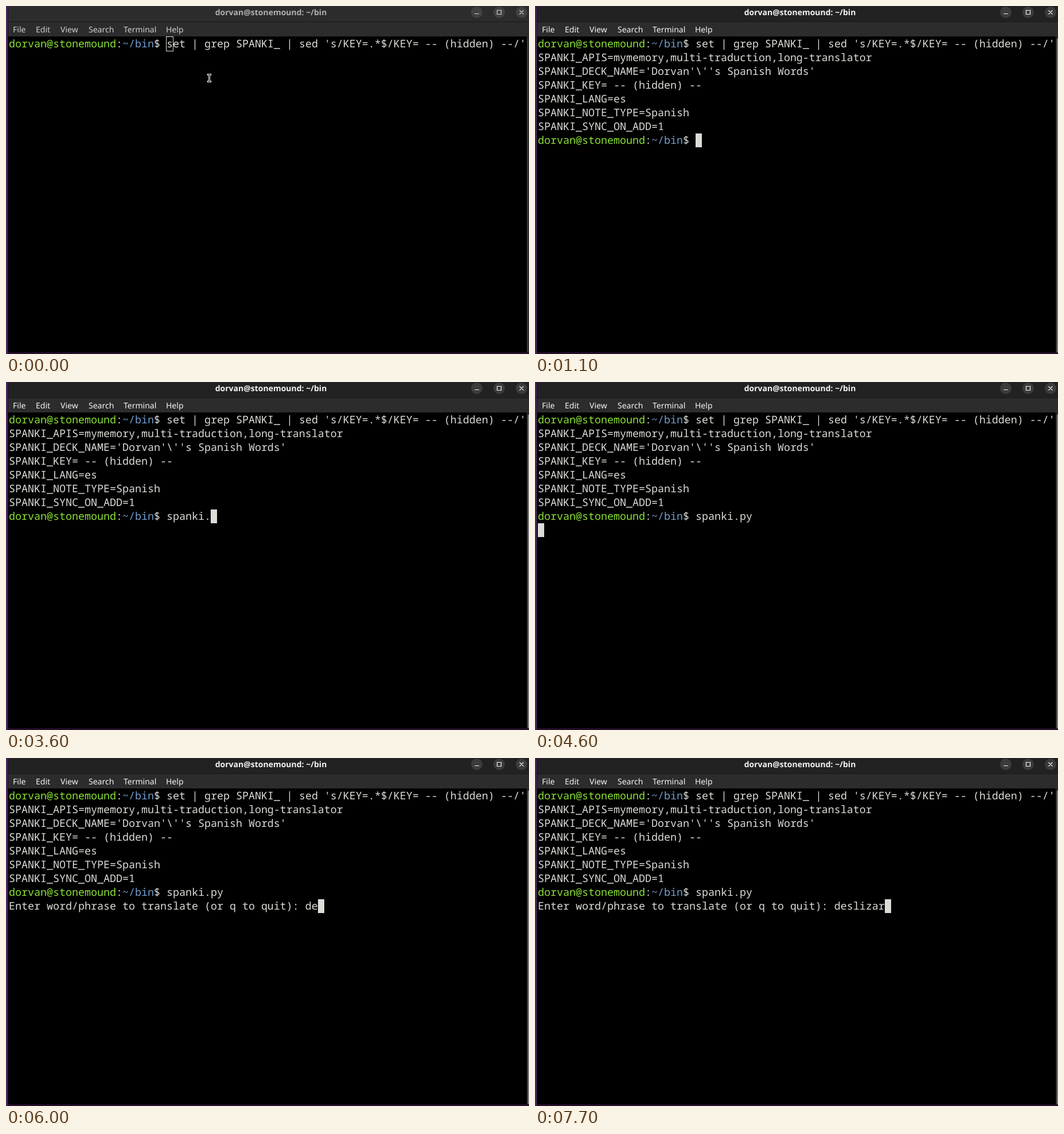
Recreate the animation shown at these times as an HTML page. Size 912 by 606 pixels, loop 8 s.

```html
<!DOCTYPE html>
<html lang="en">
<head>
<meta charset="utf-8">
<title>Terminal</title>
<style>
  html, body { margin: 0; width: 100%; height: 100%; overflow: hidden; background: #000; }
  svg { display: block; width: 912px; height: 606px; }
  text { white-space: pre; text-rendering: geometricPrecision; }
  .ui { font: 14px "Noto Sans", "Open Sans", sans-serif; fill: #f5f5f5; }
  .title { font-weight: 600; text-anchor: middle; }
  .term { font: 18.3333px "Noto Sans Mono", "DejaVu Sans Mono", monospace; fill: #dcdcd6; }
  .user { fill: #8ae234; }
  .path { fill: #729fcf; }
  .bar { fill: #222; }
  .button { fill: #3b3b3b; }
  .icon { fill: none; stroke: #f2f2f2; stroke-width: 1.2; }
  .thumb { fill: #4a4a4a; }
  .edge { fill: #a0a0a0; }
  .blurred .bar { fill: #2c2c2c; }
  .blurred .ui { fill: #cfcfcf; }
  .blurred .title { fill: #b0b0b0; }
  .blurred .button { fill: #414141; }
  .blurred .icon { stroke: #cfcfcf; }
  .blurred .thumb { fill: #3c3c3c; }
  .blurred .edge { fill: #232323; }
</style>
</head>
<body>
<svg id="stage" viewBox="0 0 912 606">
  <rect width="912" height="606"/>
  <rect width="3" height="606" fill="#4a2460"/>
  <rect x="3" width="1" height="606" fill="#1c1022"/>
  <rect class="bar" x="4" width="908" height="27"/>
  <rect x="4" y="27" width="908" height="1" fill="#171717"/>
  <rect x="4" y="28" width="908" height="25" fill="#2c2c2c"/>
  <rect x="908" y="53" width="4" height="550" fill="#232323"/>
  <rect class="thumb" x="909" y="57" width="2" height="546"/>
  <rect class="edge" x="911" y="57" width="1" height="546"/>
  <rect x="3" y="603" width="909" height="3" fill="#241029"/>
  <text class="ui title" x="462" y="16">dorvan@stonemound: ~/bin</text>
  <g id="menu"></g>
  <g class="button">
    <circle cx="821" cy="11" r="10"/><circle cx="860" cy="11" r="10"/><circle cx="899" cy="11" r="10"/>
  </g>
  <path class="icon" d="M817 13.5h8 M856.5 7.5h7v7h-7z M895.5 7.5l7 7m0-7l-7 7"/>
  <g id="rows"></g>
  <rect id="hollow" x="279.5" y="53.5" width="12" height="25" fill="none" stroke="#dcdcd6"/>
  <rect id="block" width="11" height="24" fill="#dcdcd6"/>
  <text id="under" class="term" x="280" y="72" style="fill:#000">s</text>
  <g id="pointer" fill="none">
    <path d="M351 119.5h7 M351 131.5h7 M354.5 119v13" stroke="#fff" stroke-width="3"/>
    <path d="M352 119.5h5 M352 131.5h5 M354.5 119v13" stroke="#000"/>
  </g>
</svg>
<script>
const LOOP = 8000, CELL = 11, LINE = 24, LEFT = 5, TOP = 54, PROMPT = 25;
const $ = id => document.getElementById(id);

function add(parent, tag, attrs, text = "") {
  const el = document.createElementNS("http://www.w3.org/2000/svg", tag);
  for (const key in attrs) el.setAttribute(key, attrs[key]);
  el.textContent = text;
  return parent.appendChild(el);
}

const menu = { File: 12, Edit: 52, View: 95, Search: 144, Terminal: 205, Help: 279 };
for (const label in menu) add($("menu"), "text", { class: "ui", x: menu[label], y: 46 }, label);

function addRow(row, text) {
  return add($("rows"), "text", { class: "term", x: LEFT, y: TOP + 18 + row * LINE }, text);
}

function addPrompt(row, command) {
  const line = addRow(row);
  add(line, "tspan", { class: "user" }, "dorvan@stonemound");
  add(line, "tspan", {}, ":");
  add(line, "tspan", { class: "path" }, "~/bin");
  add(line, "tspan", {}, "$ ");
  return [line, add(line, "tspan", {}, command)];
}

addPrompt(0, "set | grep SPANKI_ | sed 's/KEY=.*$/KEY= -- (hidden) --/'");
const output = [
  "SPANKI_APIS=mymemory,multi-traduction,long-translator",
  "SPANKI_DECK_NAME='Dorvan'\\''s Spanish Words'",
  "SPANKI_KEY= -- (hidden) --",
  "SPANKI_LANG=es",
  "SPANKI_NOTE_TYPE=Spanish",
  "SPANKI_SYNC_ON_ADD=1"
].map((text, i) => addRow(i + 1, text));
const [secondPrompt, command] = addPrompt(7, "");
const entry = addRow(8);
output.push(secondPrompt);

const SCRIPT = "spanki.py", WORD = "deslizar";
const QUESTION = "Enter word/phrase to translate (or q to quit): ";

// [time, row, typed characters, cursor shown]; row 8 with -1 is still blank
const steps = [
  [0, 0, 0, 0], [100, 0, 0, 1], [800, 0, 0, 0],
  [1100, 7, 0, 1], [1700, 7, 0, 0], [2300, 7, 1, 1], [2600, 7, 2, 1],
  [3300, 7, 6, 1], [3600, 7, 7, 1], [3900, 7, 8, 1], [4100, 7, 9, 1],
  [4600, 8, -1, 1], [5300, 8, 0, 0], [6000, 8, 2, 1], [6300, 8, 4, 1],
  [6500, 8, 5, 1], [7100, 8, 6, 1], [7400, 8, 7, 1], [7700, 8, 8, 1]
];

const show = (el, on) => { el.style.display = on ? "" : "none"; };

function draw(t) {
  const [time, row, typed, cursor] = steps.findLast(step => step[0] <= t);
  const asked = row === 8 && typed >= 0;
  const focused = time > 0;
  $("stage").classList.toggle("blurred", !focused);
  show($("hollow"), !focused);
  show($("pointer"), row === 0);
  show($("under"), row === 0 && cursor);
  output.forEach(el => show(el, row > 0));
  command.textContent = row === 7 ? SCRIPT.slice(0, typed) : SCRIPT;
  entry.textContent = asked ? QUESTION + WORD.slice(0, typed) : "";

  const column = row < 8 ? PROMPT + typed : asked ? QUESTION.length + typed : 0;
  show($("block"), cursor);
  $("block").setAttribute("x", LEFT + column * CELL);
  $("block").setAttribute("y", TOP + row * LINE);
}

const start = performance.now();
function tick() {
  draw((performance.now() - start) % LOOP);
  requestAnimationFrame(tick);
}
tick();
</script>
</body>
</html>
```
